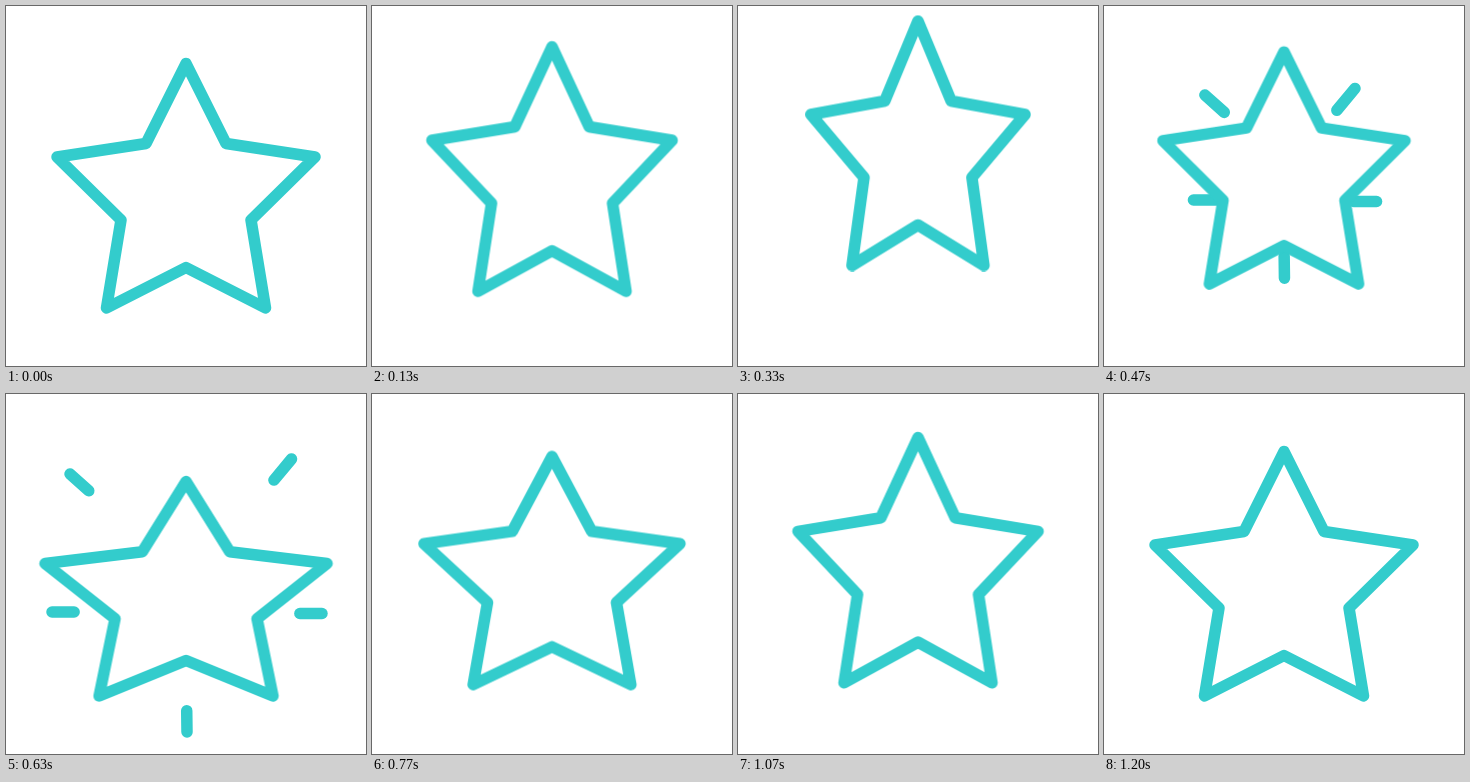
Write an HTML page without scripts that moves like this. It is 360 px wide and 360 px high and loops after 1.57 s.

```html
<!DOCTYPE html>
<html lang="en">
<head>
<meta charset="utf-8">
<title>Bouncing star</title>
<style>
  html, body { margin: 0; width: 100%; height: 100%; overflow: hidden; background: #fff; }
  svg { display: block; width: 100%; height: 100%; }

  .art {
    fill: #fff;
    stroke: #33cccc;
    stroke-width: 11.5;
    stroke-linecap: round;
    stroke-linejoin: round;
  }

  /* 30 poses per second: one pose lasts 2.123% of the loop */
  .art, .star, .rays {
    animation: 1570ms steps(2) -4ms infinite;
  }
  .art { animation-name: hop; }
  .star {
    animation-name: squash;
    transform-box: view-box;
    transform-origin: 180px 302px;
    vector-effect: non-scaling-stroke;
  }
  .rays { animation-name: burst; }

  @keyframes hop {
    0% { transform: translateY(0); }
    4.246% { transform: translateY(-7.2px); }
    8.493% { transform: translateY(-16.7px); animation-timing-function: steps(4); }
    16.985% { transform: translateY(-36px); }
    21.231% { transform: translateY(-42.5px); }
    25.478% { transform: translateY(-35px); }
    29.724% { transform: translateY(-24px); }
    33.97% { transform: translateY(-12.7px); animation-timing-function: steps(3); }
    40.34% { transform: translateY(0); }
    44.586% { transform: translateY(-4.5px); animation-timing-function: steps(5); }
    55.202% { transform: translateY(-21.7px); }
    59.448% { transform: translateY(-26.2px); }
    63.694% { transform: translateY(-21.2px); animation-timing-function: steps(4); }
    72.187% { transform: translateY(-5.2px); }
    76.433%, 100% { transform: translateY(0); }
  }

  @keyframes squash {
    0% { transform: scale(1, 1); }
    4.246% { transform: scale(.971, 1); }
    8.493% { transform: scale(.931, 1); animation-timing-function: steps(4); }
    16.985% { transform: scale(.857, 1); }
    21.231% { transform: scale(.83, 1); }
    25.478% { transform: scale(.877, .978); }
    29.724% { transform: scale(.938, .949); }
    33.97% { transform: scale(1.014, .914); animation-timing-function: steps(3); }
    40.34% { transform: scale(1.093, .877); }
    44.586% { transform: scale(1.053, .898); animation-timing-function: steps(5); }
    55.202% { transform: scale(.9, .985); }
    59.448% { transform: scale(.861, 1.006); }
    63.694% { transform: scale(.889, 1.005); animation-timing-function: steps(4); }
    72.187% { transform: scale(.972, 1.001); }
    76.433%, 100% { transform: scale(1, 1); }
  }

  /* A dash slides outwards along each ray, then shrinks into its tip */
  @keyframes burst {
    0%, 25.478% { visibility: hidden; stroke-dasharray: 18 200; stroke-dashoffset: -6; animation-timing-function: steps(1); }
    27.601% { visibility: visible; stroke-dasharray: 18 200; stroke-dashoffset: -6; animation-timing-function: steps(1); }
    29.724% { visibility: visible; stroke-dasharray: 29 200; stroke-dashoffset: -16; }
    33.97% { visibility: visible; stroke-dasharray: 31 200; stroke-dashoffset: -42; animation-timing-function: steps(3); }
    40.34% { visibility: visible; stroke-dasharray: 28 200; stroke-dashoffset: -72; animation-timing-function: steps(3); }
    46.709% { visibility: visible; stroke-dasharray: 7 200; stroke-dashoffset: -93; animation-timing-function: steps(1); }
    48.832%, 100% { visibility: hidden; stroke-dasharray: 7 200; stroke-dashoffset: -93; }
  }
</style>
</head>
<body>
<svg viewBox="0 0 360 360">
  <g class="art">
    <g class="rays">
      <path pathLength="100" d="M131 140L64 80"/>
      <path pathLength="100" d="M222.8 140.3L285.5 65"/>
      <path pathLength="100" d="M125 218H46"/>
      <path pathLength="100" d="M237 219.5H316"/>
      <path pathLength="100" d="M180 262L181 338"/>
    </g>
    <path class="star" d="M180 57.5L220 137.5L309 151L245 214L259.5 302L180 261.5L100.5 302L115 214L51 151L140 137.5Z"/>
  </g>
</svg>
</body>
</html>
```
